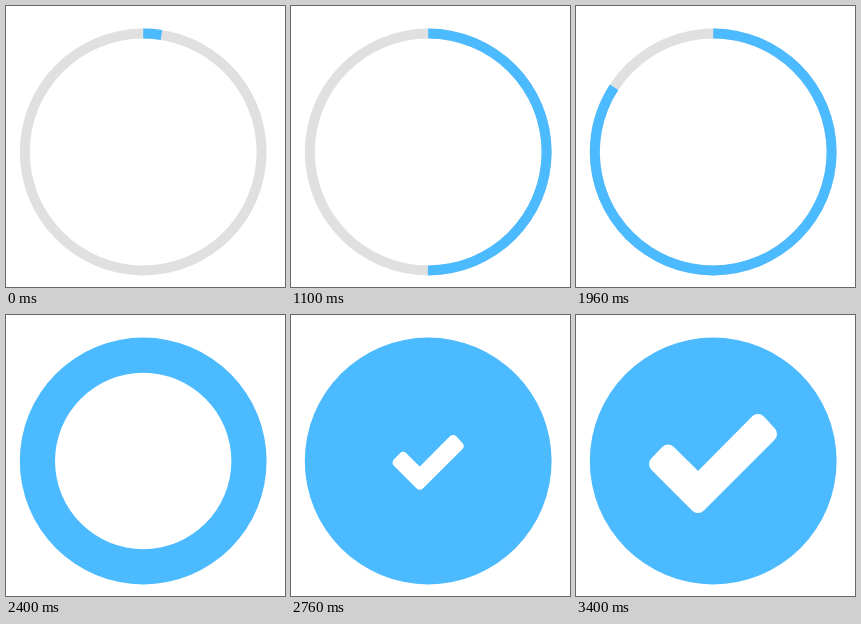
An HTML page with a canvas that plays this animation: 279x281 px, repeating every 3420 ms.

```html
<!DOCTYPE html>
<html lang="en">
<head>
<meta charset="utf-8">
<title>Progress ring to check mark</title>
<style>
  html, body { margin: 0; height: 100%; overflow: hidden; background: #fff; }
  canvas { display: block; }
</style>
</head>
<body>
<canvas id="stage" width="279" height="281"></canvas>
<script>
const ctx = document.getElementById('stage').getContext('2d');
const LOOP = 3420, FILL_START = 2322, CHECK_START = 2677, CHECK_END = 3400;
const CX = 137.2, CY = 146, RADIUS = 123.4, RING = 10;
const BLUE = '#4bbaff', GREY = '#e0e0e0';

// Time in ms and sweep in degrees
const SWEEP = [[0, 8.7], [620, 108], [1100, 180], [1960, 303], [FILL_START, 360]];
const CHECK = [[81, 149], [92, 137.5], [122, 167.3], [182, 107], [193, 119], [122, 190]];

const clamp = v => Math.min(1, Math.max(0, v));
const phase = (t, from, to) => clamp((t - from) / (to - from));

function sweepAt(t) {
  const i = SWEEP.findIndex(([time]) => time > t);
  if (i < 0) return 360;
  const [t0, a0] = SWEEP[i - 1], [t1, a1] = SWEEP[i];
  return a0 + (a1 - a0) * phase(t, t0, t1);
}

function backOut(p, s = 2.7) {
  const q = p - 1;
  return 1 + (s + 1) * q ** 3 + s * q ** 2;
}

function drawRing(color, degrees, width) {
  const start = -Math.PI / 2;
  const end = start + degrees * Math.PI / 180;
  ctx.fillStyle = color;
  ctx.beginPath();
  ctx.arc(CX, CY, RADIUS, start, end);
  ctx.arc(CX, CY, Math.max(0, RADIUS - width), end, start, true);
  ctx.fill();
}

function drawCheck(scale) {
  ctx.save();
  ctx.translate(CX, CY);
  ctx.scale(scale, scale);
  ctx.translate(-CX, -CY);
  ctx.beginPath();
  CHECK.forEach(([x, y]) => ctx.lineTo(x, y));
  ctx.closePath();
  ctx.fillStyle = ctx.strokeStyle = '#fff';
  ctx.lineWidth = 16;
  ctx.lineJoin = 'round';
  ctx.fill();
  ctx.stroke();
  ctx.restore();
}

function draw(t) {
  ctx.fillStyle = '#fff';
  ctx.fillRect(0, 0, 279, 281);
  if (t < FILL_START) drawRing(GREY, 360, RING);
  const width = RING + (RADIUS - RING) * phase(t, FILL_START, CHECK_START);
  drawRing(BLUE, sweepAt(t), width);
  if (t > CHECK_START) drawCheck(backOut(phase(t, CHECK_START, CHECK_END)));
}

const origin = performance.now();
function tick() {
  draw((performance.now() - origin) % LOOP);
  requestAnimationFrame(tick);
}
tick();
</script>
</body>
</html>
```
